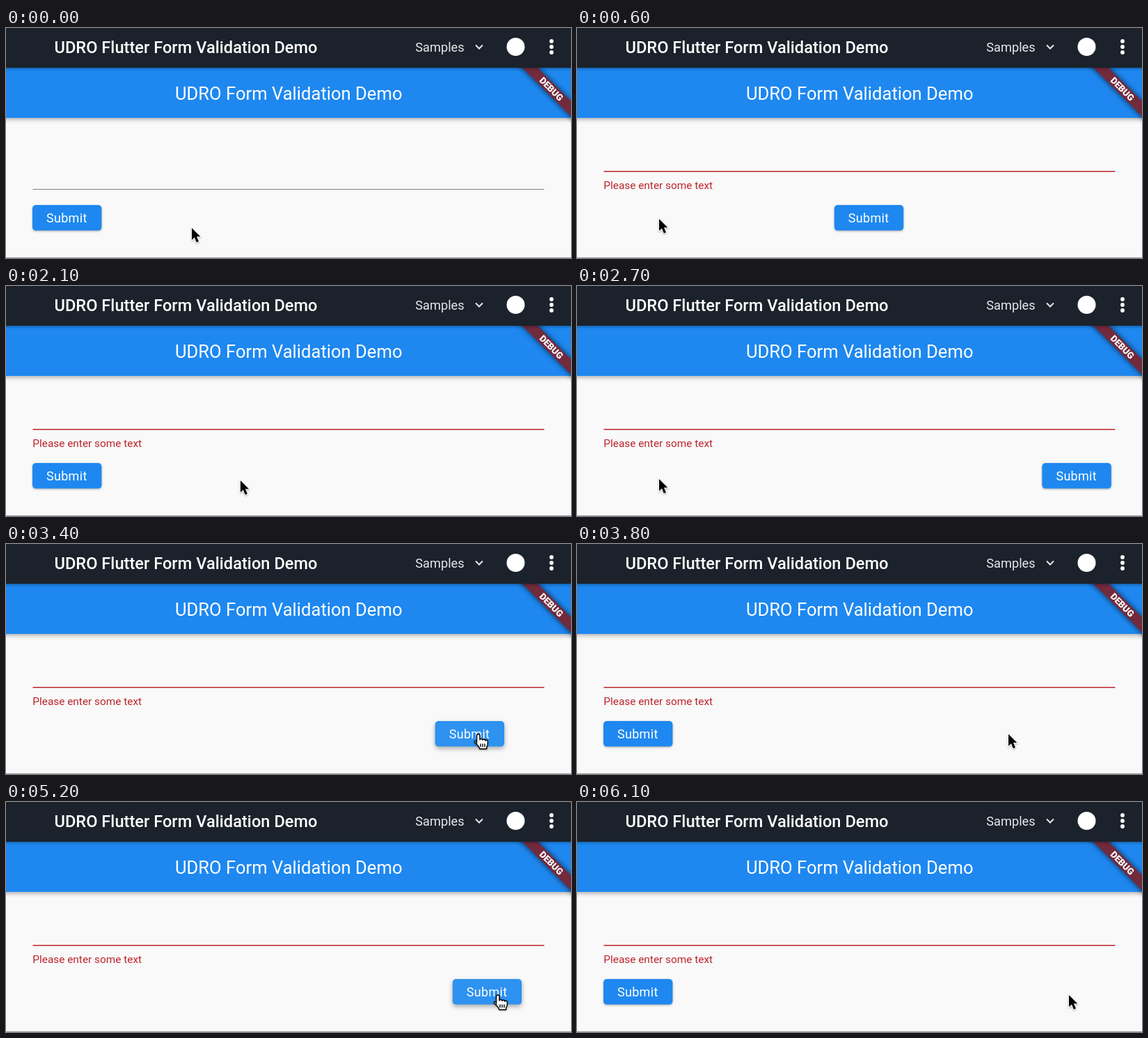
An HTML page for the animation above (7.6 s loop, 812 by 330 pixels).

```html
<!DOCTYPE html>
<html lang="en">
<head>
<meta charset="utf-8">
<title>Form Validation Demo</title>
<style>
  html, body { margin: 0; width: 100%; height: 100%; overflow: hidden; background: #f9f9f9; }
  svg { display: block; font-family: Roboto, sans-serif; }
  .mid { text-anchor: middle; }
  #bar { filter: drop-shadow(0 2px 3px rgba(0,0,0,.32)); }
  #top { filter: drop-shadow(0 1.5px 2px rgba(0,0,0,.4)); }
  #button rect { filter: drop-shadow(0 1.5px 1.5px rgba(0,0,0,.32)); fill: #1e88f0; }
  #button.lit rect { filter: drop-shadow(0 3px 3px rgba(0,0,0,.32)); fill: #2e92f0; }
  #ribbon { filter: drop-shadow(0 0 4px rgba(0,0,0,.7)); }
  #pointer { filter: drop-shadow(0 1px 1px rgba(0,0,0,.3)); }
</style>
</head>
<body>
<svg width="812" height="330" viewBox="0 0 812 330">
  <rect width="812" height="330" fill="#f9f9f9"/>
  <rect y="329" width="812" height="1" fill="#999"/>
  <rect id="bar" x="-10" y="50" width="832" height="79" fill="#1e88f0"/>
  <text class="mid" x="406.2" y="103" font-size="25.6" fill="#fff">UDRO Form Validation Demo</text>
  <g transform="translate(814.5 56.7) rotate(45)">
    <rect id="ribbon" x="-70" y="36" width="140" height="15.4" fill="#722a3d"/>
    <text class="mid" y="48.1" font-size="13.1" font-weight="900" fill="#fff">DEBUG</text>
  </g>

  <rect id="top" x="-10" y="-10" width="832" height="67" fill="#1b222b"/>
  <text x="69.5" y="35.5" font-size="23.65" font-weight="500" fill="#fff">UDRO Flutter Form Validation Demo</text>
  <text x="588.3" y="33.5" font-size="18.2" fill="#e6e8ea">Samples</text>
  <path d="M675 24.5l5 5 5-5" fill="none" stroke="#e6e8ea" stroke-width="2"/>
  <g fill="#fff">
    <circle cx="732.5" cy="27" r="13"/>
    <circle cx="784" cy="19" r="2.9"/>
    <circle cx="784" cy="27" r="2.9"/>
    <circle cx="784" cy="35" r="2.9"/>
  </g>

  <path id="line" d="M38.5 0H773.5"/>
  <text id="error" x="38.3" y="230.5" font-size="15.4" fill="#bb252d">Please enter some text</text>
  <g id="button">
    <rect y="254" width="99.4" height="36.6" rx="5"/>
    <text class="mid" x="49.3" y="279" font-size="18" letter-spacing=".3" fill="#fff">Submit</text>
  </g>

  <g id="pointer">
    <circle id="click" r="39" fill="none" stroke="#111" stroke-width="2"/>
    <path id="arrow" d="M0 0V17L4 13.5 6.8 20.5 10 19.2 7 12.3H12.3Z" stroke="#fff" stroke-width="2" paint-order="stroke"/>
    <g id="hand" stroke="#000" stroke-width="1.4" stroke-linejoin="round">
      <path fill="#fff" d="M-2.4 13V2a2.2 2.2 0 0 1 4.4 0V8q0-1.5 2-1.5t2 2q0-1.5 2-1.3t2 2q0-1.2 1.7-1t1.6 2.2V14q0 2-1.5 4V21H2q-.5-2-3-5L-5.5 11.5q-.5-2 1-2t2 2z"/>
      <path d="M3 13.5v4.5M6 13.5v4.5M9 13.5v4.5"/>
    </g>
  </g>
</svg>
<script>
const LOOP = 7600, STEP = 100, FLEE = 350, LEFT = 38, TRAVEL = 636.4, WIDTH = 99.4;
// Moments at which the button runs to the opposite side
const flees = [420, 1310, 2370, 3335, 4244, 5152];
// Pointer stops: time, x, y
const stops = [
  [40, 267, 287], [420, 118, 274], [620, 118, 274],
  [1300, 700, 282], [1708, 700, 282],
  [2380, 118, 277], [2720, 118, 277],
  [3330, 679, 273], [3690, 679, 273],
  [4240, 112, 271], [4720, 112, 271],
  [5150, 707, 277], [LOOP, 707, 277]
];

const el = id => document.getElementById(id);
const show = (id, on) => el(id).style.display = on ? '' : 'none';
const clamp = v => Math.min(1, Math.max(0, v));
const ease = v => { const p = clamp(v); return p * p * (3 - 2 * p); };

function pointerAt(t) {
  const i = Math.max(1, stops.findIndex(s => s[0] >= t));
  const [t0, x0, y0] = stops[i - 1], [t1, x1, y1] = stops[i];
  const k = ease((t - t0) / (t1 - t0));
  return [x0 + (x1 - x0) * k, y0 + (y1 - y0) * k];
}

function buttonAt(t) {
  const side = flees.reduce((sum, s, i) => sum + (i % 2 ? -1 : 1) * ease((t - s) / FLEE), 0);
  return LEFT + TRAVEL * side;
}

function draw(t) {
  const [px, py] = pointerAt(t), bx = buttonAt(t);
  const over = px > bx && px < bx + WIDTH && py > 254;
  const moving = flees.some(s => t > s && t < s + FLEE);
  const invalid = t >= flees[0];

  el('button').setAttribute('transform', `translate(${bx} 0)`);
  el('button').classList.toggle('lit', over && moving);
  el('line').setAttribute('transform', `translate(0 ${invalid ? 205.8 : 231.5})`);
  el('line').setAttribute('stroke', invalid ? '#bb252d' : '#808080');
  el('line').setAttribute('stroke-width', invalid ? 1.5 : 1.2);
  el('error').setAttribute('opacity', clamp((t - flees[0]) / 167));

  el('pointer').setAttribute('transform', `translate(${px} ${py})`);
  show('hand', over);
  show('arrow', !over);
  show('click', t > 4250 && t < 4450);
}

const start = performance.now();
function tick() {
  const t = (performance.now() - start) % LOOP;
  draw(Math.floor(t / STEP) * STEP);
  requestAnimationFrame(tick);
}
tick();
</script>
</body>
</html>
```
